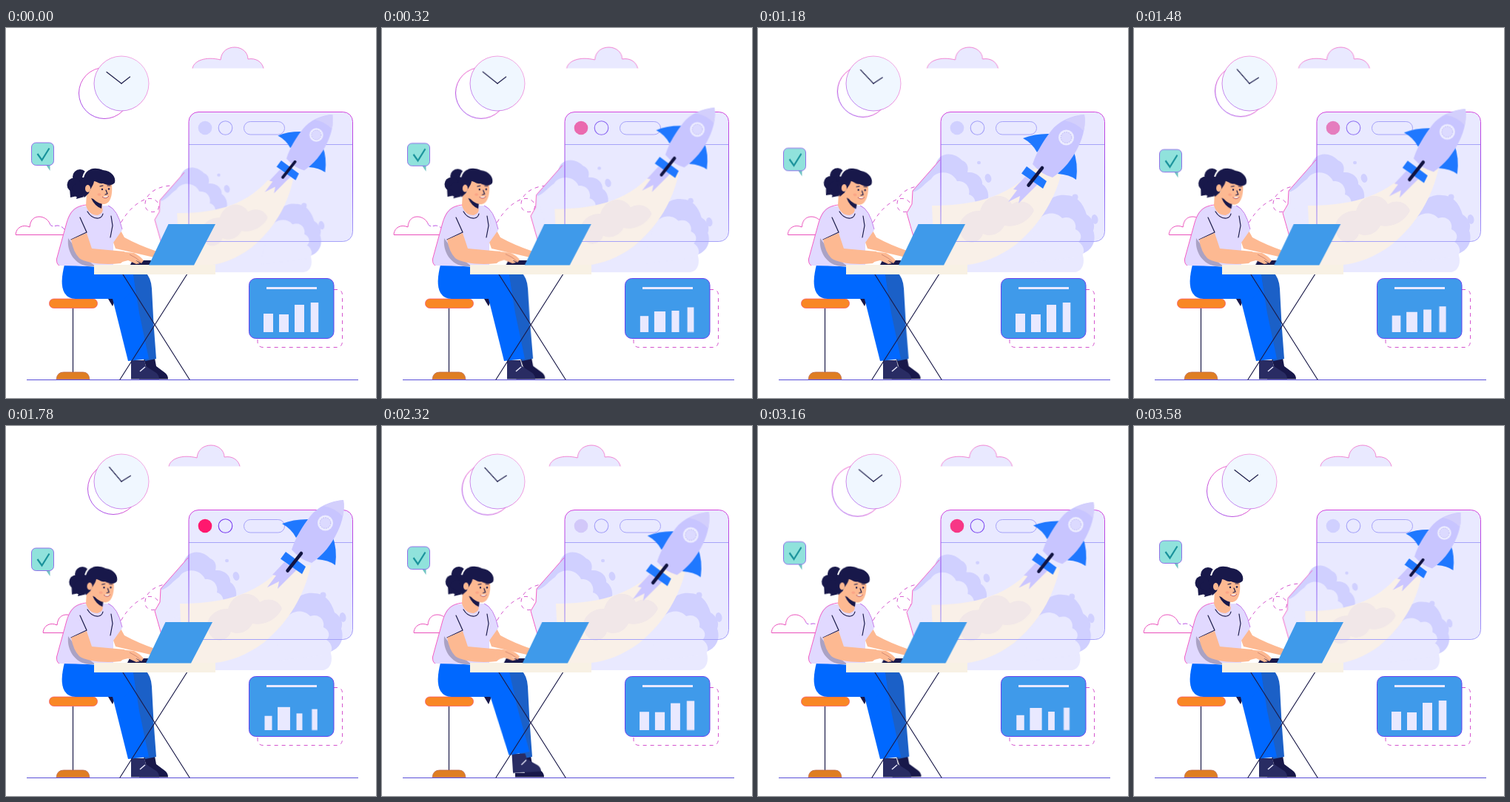
Animation, 500 px wide and 500 px high, one loop 3600 ms. Source, as an HTML page:

```html
<!DOCTYPE html>
<html lang="en">
<head>
<meta charset="utf-8">
<title>Launch</title>
<style>
  html, body { margin: 0; width: 100%; height: 100%; overflow: hidden; background: #fff; }
  svg { display: block; width: 100vw; height: 100vh; }
  .navy { fill: #18184a; }
  .pale { fill: #e9e9ff; }
  .lilac { fill: #d0d0ff; }
  .blue { fill: #3f9aea; }
  .royal { fill: #0068ff; }
  .skin { fill: #fdb992; }
  .thin { fill: none; stroke: #1c1c4a; stroke-width: 1.2; stroke-linecap: round; }
  .dash { fill: none; stroke: #d040c8; stroke-width: .9; stroke-dasharray: 5 5; }
</style>
</head>
<body>
<svg viewBox="0 0 500 500">
  <defs>
    <linearGradient id="edge" x1="0" y1="1" x2="1" y2="0">
      <stop offset="0" stop-color="#7a35f5"/>
      <stop offset=".5" stop-color="#e845c4"/>
      <stop offset="1" stop-color="#f08ad8"/>
    </linearGradient>
    <linearGradient id="rim" x1="0" y1="1" x2="0" y2="0">
      <stop offset="0" stop-color="#a5a2f8"/>
      <stop offset=".5" stop-color="#8a4cf0"/>
      <stop offset="1" stop-color="#d445dc"/>
    </linearGradient>
  </defs>

  <!-- sky -->
  <g id="cloud">
    <path class="pale" d="M252 54.500C254 44 270 38 290 43C291 31 300 26 309 26C319 26 327 33 327 42C338 40 346 46 348 54.500Z"/>
    <path fill="none" stroke="#f06ac8" stroke-width=".8" d="M252 54.500C254 44 270 38 290 43C291 31 300 26 309 26C319 26 327 33 327 42C338 40 346 46 348 54.500"/>
  </g>
  <circle id="shade" cx="133" cy="88" r="34.500" fill="#fff" stroke="url(#edge)" stroke-width=".9"/>
  <circle cx="156" cy="75" r="37" fill="#f0f7ff" stroke="url(#edge)" stroke-width=".6"/>
  <path id="minute" class="thin" d="M156 75L136 59.500"/>
  <path id="hour" class="thin" d="M156 75L167.500 66"/>

  <g id="badge">
    <path d="M54 185L59.500 193L59.500 184Z" fill="#72c4c4"/>
    <rect x="34.500" y="155" width="30" height="30.500" rx="6" fill="#90e2dc" stroke="#8b62e8" stroke-width=".9"/>
    <path d="M42.500 170L48.500 178.500L58.500 162.500" fill="none" stroke="#19929b" stroke-width="2.200"/>
  </g>
  <g id="mist" fill="none" stroke="#e83cb4" stroke-width=".9">
    <path d="M13 279.500H82M13 279C14 269 23 265 32 269C33 258 39 255 45 255C51 255 57 259 59 264"/>
    <path d="M59 264C61 269 64 268 69 267Q78 267 82 278" stroke="#b13ee0" stroke-dasharray="6 3"/>
  </g>
  <path class="dash" d="M147 281C156 257 170 239 188 231.500C202 227 210 238 205 246C198 252 187 247 188 238C188 226 202 212 229 213"/>

  <!-- browser window -->
  <rect class="pale" x="247" y="113.500" width="221.500" height="175" rx="13"/>
  <g id="smoke">
    <path class="pale" d="M246 178L209 220L208 238L201 250L211 285L217 330H428C440 329 443 314 437 302L420 270L300 245L286 210Z"/>
    <path class="lilac" d="M209 220L240 185C244 168 263 166 276 179C285 183 284 191 283 195C297 194 304 204 303 211C312 217 313 229 309 236L240 245Z"/>
    <path class="pale" d="M209 222C219 220 226 209 234 204C242 191 263 193 269 207C282 206 287 217 285 225C293 227 297 237 290 245L222 260Z"/>
    <path d="M246 178L209 220L208 238L201 250L211 285" fill="none" stroke="#f45cc4"/>
    <ellipse class="lilac" cx="298.500" cy="182" rx="2.500" ry="2.300"/>
    <ellipse class="lilac" cx="311" cy="203" rx="4.300" ry="6" transform="rotate(-15 311 203)"/>
    <path class="lilac" d="M382 255C387 232 402 224 416 226C431 226 440 238 444 252C453 258 456 266 453 274C458 288 451 301 438 305L405 285Z"/>
    <path class="pale" d="M375 265C382 249 402 246 411 257C424 253 431 263 429 272C438 276 438 285 433 289C441 294 443 304 436 309L360 318Z"/>
    <ellipse class="lilac" cx="428.500" cy="228.500" rx="4" ry="4"/>
    <ellipse class="lilac" cx="455" cy="258.500" rx="4.300" ry="6.500" transform="rotate(-12 455 258)"/>
    <path d="M235 240C284 240 336 232 373 190L412 188C403 229 383 264 348 293C325 310 302 318 283 320H245Q236 285 235 240Z" fill="#f9f0e8"/>
    <path d="M272 272C270 260 283 246 300 247C307 223 334 221 343 238C354 231 369 235 373 247C365 264 345 270 333 267C326 281 311 282 304 278C300 293 276 296 272 272Z" fill="#f1e7e8"/>
  </g>
  <path d="M247 157.500H468.500M247 288.500H440" fill="none" stroke="#a5a2f8"/>
  <rect x="247" y="113.500" width="221.500" height="175" rx="13" fill="none" stroke="url(#rim)"/>
  <circle id="dot" cx="269" cy="135" r="9.300" fill="#d0d0ff"/>
  <circle id="ring" cx="296.500" cy="135" r="9.300" fill="none" stroke="#a5a2f8" stroke-width="1.100"/>
  <rect x="321.500" y="126.500" width="55" height="17.500" rx="8.700" fill="none" stroke="#a5a2f8"/>

  <!-- rocket -->
  <g id="lift"><g id="rocket">
    <path d="M361 201L345 218L350 219L338 235L354 227L352 237L371 218L378 211Z" fill="#cbc6ff"/>
    <path fill="#1f78ff" d="M358 149Q375 142 397 143L377 168Q371 156 358 149ZM426 165Q433 183 430 205Q421 198 405 197ZM363 187L390 207L385 217L356 196.500Z"/>
    <path d="M441 117C424 118 406 126 396 139C386 152 377 166 371 184Q383 198 398 202C413 192 425 177 433 160C440 146 443 130 441 117Z" fill="#c8c5ff"/>
    <path d="M441 117C431 118 422 121 414 125Q430 128 440 139Q443 128 441 117Z" fill="#d3cffc"/>
    <circle cx="416.500" cy="148" r="10.500" fill="#ececff"/>
    <circle cx="416.500" cy="148" r="7.300" fill="#dcdaff" stroke="#b8b4f4" stroke-dasharray="1.600 1.500"/>
    <path d="M365.500 212.500L384 189" stroke="#111340" stroke-width="4.500" stroke-linecap="round"/>
  </g></g>

  <!-- chart card -->
  <path class="dash" d="M443 353.500H448Q454.500 354 454.500 361V424Q454 431.500 447 431.500H347Q340 431 340 424V418"/>
  <rect class="blue" x="328.500" y="338.500" width="114.500" height="81" rx="9" stroke="#6540ee"/>
  <path d="M352 351.500H420" stroke="#e9e9ff" stroke-width="3"/>
  <g id="bars" class="pale"></g>

  <!-- furniture -->
  <path d="M28 475.500H476" stroke="#5a50d8"/>
  <path d="M90.500 379V466" class="thin"/>
  <path d="M68 474.500Q69 465 78 465H104Q112 465 113 474.500Z" fill="#df7e22" stroke="#b96552" stroke-width=".7"/>
  <rect x="58.500" y="366" width="65" height="12.500" rx="6" fill="#f98725" stroke="#f4506c" stroke-width=".7"/>

  <!-- legs -->
  <path d="M138 366H148L144 376Z" class="navy"/>
  <g id="back">
    <path class="navy" d="M186 447L201 446L203 457L215 466Q219 469 219 474.500H180V469H193Z"/>
    <path d="M160 330H188Q196 337 197 352L199.500 400L203 447L188 450L165 375Z" fill="#1b60c7"/>
  </g>
  <g id="front">
    <path d="M169 449H187L189 457L203 466Q207 469 207 474.500H169Z" fill="#292c63"/>
    <path d="M181 464L188 458" stroke="#eeeeff" stroke-width="1.500"/>
    <path class="royal" d="M140 350L165 450L193 447L180 385L172 335H150Z"/>
  </g>
  <path class="royal" d="M79 320C75 336 74 349 79 358Q84 366 94 366H160L174 350L171 326Z"/>

  <!-- body -->
  <path class="skin" d="M138 270L154 272L160 283Q178 293 204 302L200 310L148 298Z"/>
  <path d="M98 241C88 244 84 254 82 263L68.500 312Q68 319 72 321L119 322H145L145 290L157 273Q151 248 140 240Z" fill="#e1d9ff"/>
  <path d="M110 239C92 240 86 250 82 263L68.500 312Q68 319 72 321" fill="none" stroke="#f45cc4"/>
  <path d="M138 240Q151 245 157 272" fill="none" stroke="#c47aea"/>
  <path d="M84 284C82 303 93 320 112 322H121L100 306Z" fill="#aaa2c4"/>
  <path class="skin" d="M109 222H130V242Q133 250 124 253Q112 253 108 240Z"/>
  <path class="thin" d="M110 248Q116 258 125 257Q130 256 131 251M100 256L109 276L88 286M142 254L144 267L141 283"/>
  <path class="skin" d="M88 286L109 277L116 298L160 302L163 311L155 318C130 321 107 317 99 311Q91 303 88 286Z"/>

  <!-- head -->
  <g id="head">
    <g class="navy">
      <circle cx="100" cy="201" r="10"/><circle cx="92" cy="212" r="9.500"/><circle cx="99" cy="219" r="10"/>
      <path d="M86 217L87 229L96 227L95 231L106 228Z"/>
      <path d="M115 230L130 235L129 244Q120 241 115 230Z"/>
    </g>
    <path class="skin" d="M111 207H142C145 219 143 237 133 238C122 238 113 228 111 216Z"/>
    <path class="navy" d="M102 206C105 190 119 187 131 192C143 193 149 202 147 209C143 214 136 212 131 210C126 211 122 207 119 207C118 214 114 216 112 223L106 229C101 219 101 211 102 206Z"/>
    <ellipse class="skin" cx="110.500" cy="217" rx="3.500" ry="5"/>
    <path d="M104 202Q106 193 114 190" fill="none" stroke="#fff" stroke-width="2"/>
    <path class="thin" d="M127 214L131 213M137 213L141 213M135 219L137 224L134 225"/>
    <circle class="navy" cx="130" cy="218" r="1.200"/><circle class="navy" cx="139" cy="217.500" r="1.200"/>
    <path d="M130 228Q135 232 139 227" fill="#fff" stroke="#b65058" stroke-width="1"/>
    <ellipse cx="126" cy="225" rx="2.500" ry="1.700" fill="#fba586"/>
  </g>

  <!-- desk -->
  <path d="M158 333L248 475M244.500 333L154 475" class="thin"/>
  <path d="M119 320H283V333H119Z" fill="#f8f1e4"/>
  <g id="laptop">
    <path class="navy" d="M168 320L171 314H196V320Z"/>
    <path class="blue" d="M219.500 265H283L254 320.500H193Z"/>
  </g>
  <g id="hand">
    <path class="skin" d="M155 302L173 304Q181 308 186 314L183 318L174 313L181 318L176 319L165 314L153 317Z"/>
    <path d="M167 306L176 311L183 317" fill="none" stroke="#c9806e" stroke-width=".8"/>
  </g>
</svg>
<script>
  const LOOP = 3600, PULSE = 1200;
  const SINE = "cubic-bezier(.364,0,.636,1)";
  const $ = id => document.getElementById(id);

  // steps: [time in ms, value]
  function play(el, steps, { span = LOOP, prop = "transform", origin = "0px 0px" } = {}) {
    el.style.transformOrigin = origin;
    const frames = steps.map(([t, v]) => ({ offset: t / span, [prop]: v, easing: SINE }));
    el.animate(frames, { duration: span, iterations: Infinity });
  }
  const sway = (el, from, to, opts = {}) => {
    const span = opts.span || LOOP;
    play(el, [[0, from], [span / 2, to], [span, from]], opts);
  };
  const move = (x, y) => `translate(${x}px,${y}px)`;
  const turn = a => `rotate(${a}deg)`;
  const each = (steps, f) => steps.map(([t, v]) => [t, f(v)]);

  sway($("cloud"), move(0, 0), move(-32, 0));
  sway($("mist"), move(0, 0), move(37, 0));
  sway($("shade"), move(0, 0), move(12, -3));
  sway($("badge"), move(0, 0), move(0, 10));
  sway($("laptop"), move(0, 0), move(-4, 0));
  sway($("minute"), turn(0), turn(12), { origin: "156px 75px" });
  sway($("hour"), turn(0), turn(6), { origin: "156px 75px" });

  const pulse = { span: PULSE };
  sway($("lift"), move(0, 0), move(15, -17), pulse);
  sway($("dot"), "#d0d0ff", "#ff186e", { ...pulse, prop: "fill" });
  sway($("ring"), "#a5a2f8", "#7638ee", { ...pulse, prop: "stroke" });

  const grow = each([[0, .887], [600, 1], [3000, 1], [LOOP, .887]], s => `scale(${s})`);
  play($("smoke"), grow, { origin: "201px 330px" });
  play($("rocket"), grow, { origin: "441px 117px" });

  // centre, width, height, pulse scale
  for (const [x, w, h, s] of [[354.5, 13, 25, .77], [375.5, 13, 24, 1.3], [396.5, 13, 37, .61], [417, 10.5, 40, .71]]) {
    const bar = document.createElementNS("http://www.w3.org/2000/svg", "rect");
    const box = { x: x - w / 2, y: 411 - h, width: w, height: h };
    for (const key in box) bar.setAttribute(key, box[key]);
    $("bars").append(bar);
    sway(bar, "scale(1)", `scale(${s})`, { ...pulse, origin: `${x}px 411px` });
  }

  play($("head"), each([[0, 0], [900, 1.15], [2050, .35], [2800, 1], [LOOP, 0]],
    k => `${move(3.4 * k, 0)} ${turn(4.8 * k)}`), { origin: "122px 243px" });
  play($("hand"), each([[0, 0], [660, -4], [1180, 0], [1780, 0], [2320, -4], [2720, 0], [LOOP, 0]], turn), { origin: "150px 310px" });
  play($("back"), each([[0, 0], [700, -1.4], [1400, 0], [2350, 0], [2720, -1.4], [LOOP, 0]], turn), { origin: "182px 340px" });
  play($("front"), each([[0, 0], [1800, 0], [2300, 1], [2680, 0], [LOOP, 0]],
    k => `${move(0, -5 * k)} ${turn(-3.6 * k)}`), { origin: "165px 345px" });
</script>
</body>
</html>
```
